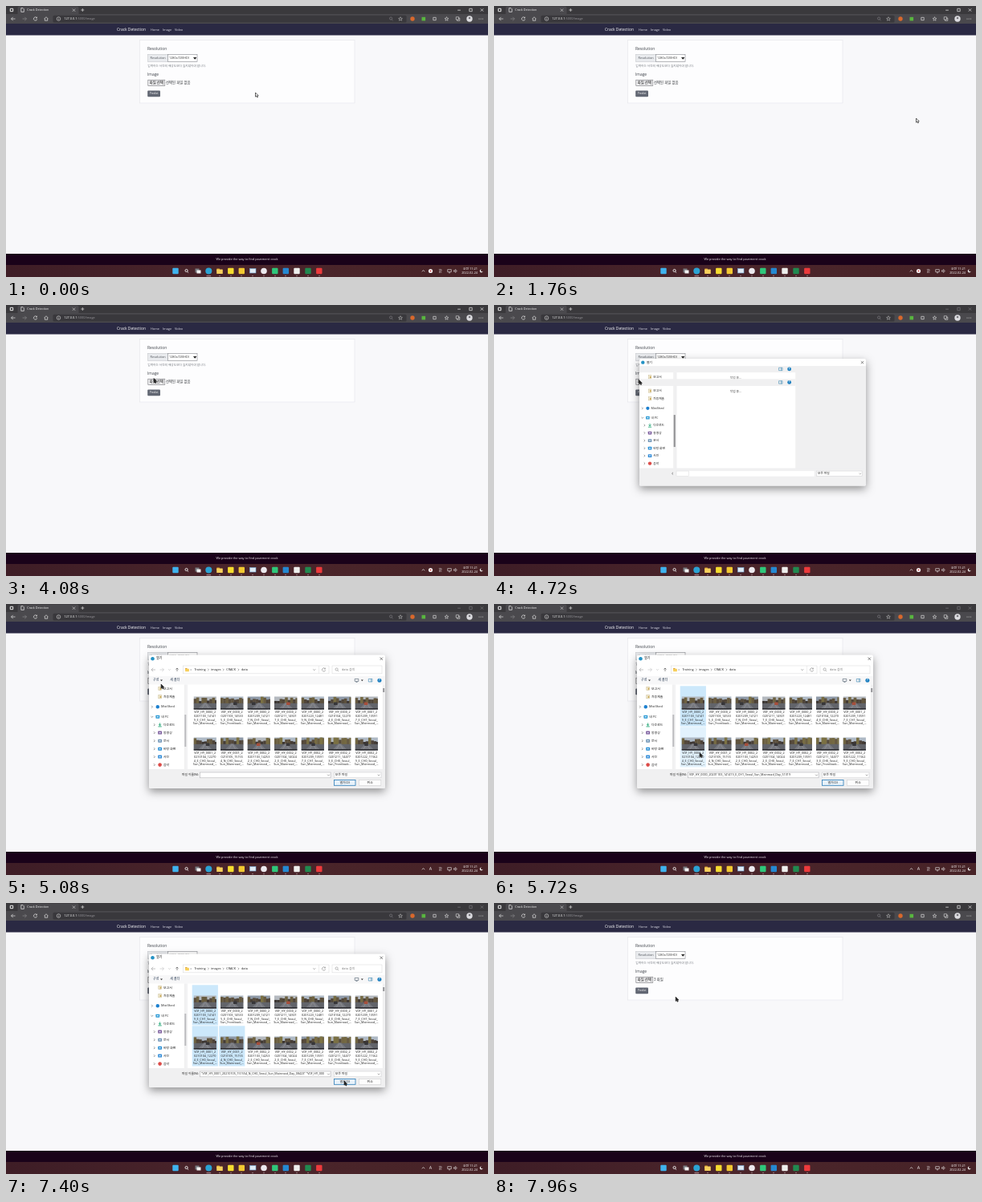
An HTML page with a canvas that plays this animation: 600 by 338 pixels, repeating every 8 s.

```html
<!DOCTYPE html>
<html lang="ko">
<head>
<meta charset="utf-8">
<title>Crack Detection</title>
<style>
html, body { margin: 0; width: 100%; height: 100%; overflow: hidden; background: #f8f8fa; }
canvas { display: block; width: 100vw; height: 100vh; }
</style>
</head>
<body>
<canvas></canvas>
<script>
const W = 600, H = 338, LOOP = 8000;
const OPEN = 4640, LOADED = 4800, PICK1 = 5440, PICK2 = 5960, PICK3 = 6240, CLOSE = 7640;
const canvas = document.querySelector('canvas');
const ctx = canvas.getContext('2d');
const ratio = window.devicePixelRatio || 1;
canvas.width = W * ratio;
canvas.height = H * ratio;

function rect(x, y, w, h, fill, border, lineWidth = 0.6) {
  if (fill) { ctx.fillStyle = fill; ctx.fillRect(x, y, w, h); }
  if (border) { ctx.strokeStyle = border; ctx.lineWidth = lineWidth; ctx.strokeRect(x, y, w, h); }
}
function round(x, y, w, h, r, fill) {
  ctx.beginPath();
  ctx.roundRect(x, y, w, h, r);
  ctx.fillStyle = fill;
  ctx.fill();
}
function dot(x, y, r, fill) {
  ctx.beginPath();
  ctx.arc(x, y, r, 0, 7);
  ctx.fillStyle = fill;
  ctx.fill();
}
// Strokes an icon path around (x, y).
function icon(path, x, y, color, width = 0.7) {
  ctx.save();
  ctx.translate(x, y);
  ctx.strokeStyle = color;
  ctx.lineWidth = width;
  ctx.stroke(new Path2D(path));
  ctx.restore();
}
function text(str, x, y, size, color, align = 'left', weight = 400) {
  ctx.font = `${weight} ${size}px "Open Sans", "Noto Sans CJK KR", "Noto Sans CJK", sans-serif`;
  ctx.textAlign = align;
  ctx.textBaseline = 'middle';
  ctx.fillStyle = color;
  ctx.fillText(str, x, y);
}

const ICON = {
  cross: 'M-1.7-1.7L1.7 1.7M1.7-1.7L-1.7 1.7',
  plus: 'M-2 0H2M0-2V2',
  box: 'M-1.7-1.7H1.7V1.7H-1.7Z',
  page: 'M-1.7-2.4H.6L1.8-1.2V2.4H-1.7Z',
  back: 'M2.5 0H-2.5M-.3-2.2L-2.5 0L-.3 2.2',
  forward: 'M-2.5 0H2.5M.3-2.2L2.5 0L.3 2.2',
  up: 'M0 2V-2M-1.6-.5L0-2L1.6-.5',
  reload: 'M1.7-1.3A2.1 2.1 0 1 0 2.1 .4M1.9-2.4V-1H.5',
  home: 'M-2.3 0L0-2.3L2.3 0M-1.7-.4V2.2H1.7V-.4',
  info: 'M2.3 0A2.3 2.3 0 1 1-2.3 0A2.3 2.3 0 1 1 2.3 0M0-.3V1.3M0-1.3V-.8',
  lens: 'M1.2-.5A1.6 1.6 0 1 1-2-.5A1.6 1.6 0 1 1 1.2-.5M.7 .8L2.1 2.2',
  star: 'M0-2.4L.7-.7L2.4-.6L1.1 .5L1.5 2.2L0 1.3L-1.5 2.2L-1.1 .5L-2.4-.6L-.7-.7Z',
  layers: 'M-2.3-2.3H1V1H-2.3ZM-1 1V2.3H2.3V-1H1',
  right: 'M-.7-1.4L.7 0L-.7 1.4',
  down: 'M-1.4-.7L0 .7L1.4-.7',
  chevUp: 'M-1.7 .8L0-.9L1.7 .8',
  screen: 'M-2.3-1.8H2.3V1.2H-2.3ZM-1 2.3H1',
  speaker: 'M-2-.7H-1L.3-1.9V1.9L-1 .7H-2ZM1.2-1Q2 0 1.2 1'
};

function drawBrowser(inactive) {
  rect(0, 0, W, 11, '#3a393c');
  round(14.5, 0.5, 76, 12, 2, '#4a494d');
  rect(0, 10, W, 12.5, '#4a494d');
  icon(ICON.box, 7, 5, '#eee', 1);
  icon(ICON.page, 20.5, 5, '#eee');
  text('Crack Detection', 26.3, 5.2, 3.7, '#f2f2f2');
  icon(ICON.cross, 84.5, 5.2, '#ddd', 0.6);
  icon(ICON.plus, 95.3, 5, '#ddd');
  const control = inactive ? '#77767a' : '#eee';
  icon('M-1.8 0H1.8', 564, 5.2, control);
  icon(ICON.box, 578.5, 5, control);
  icon(ICON.cross, 592.5, 5, control);

  icon(ICON.back, 9, 16, '#e4e4e4');
  icon(ICON.forward, 23, 16, '#88878b');
  icon(ICON.reload, 36.5, 16, '#e4e4e4');
  icon(ICON.home, 50, 16, '#e4e4e4');
  round(58.5, 11.8, 440, 8.6, 1.5, '#39383c');
  icon(ICON.info, 65.5, 16, '#ddd', 0.6);
  text('127.0.0.1', 72.2, 16.2, 3.85, '#fff');
  text(':5000/image', 88.6, 16.2, 3.85, '#98979c');
  icon(ICON.lens, 479.5, 16, '#929196', 0.5);
  icon(ICON.star, 491, 16, '#ccc', 0.5);
  dot(506, 16, 2.7, '#d9682c');
  rect(517.5, 13.8, 4.6, 4.6, '#58b63f');
  icon(ICON.box, 533.5, 16, '#ddd');
  icon(ICON.star, 548.5, 16, '#ddd', 0.6);
  icon(ICON.layers, 562.5, 16, '#ddd', 0.6);
  dot(577, 16, 3.7, '#dcdce0');
  dot(577, 15, 1.3, '#77767c');
  for (const x of [589, 591.2, 593.4]) dot(x, 16, 0.5, '#ddd');
}

function drawPage(t) {
  rect(0, 22, W, 287, '#f8f8fa');
  rect(0, 22, W, 14.5, '#2a2943');
  text('Crack Detection', 138, 29.4, 4.9, '#fff');
  text('Home', 180, 29.6, 3.9, '#dedee6');
  text('Image', 195, 29.6, 3.9, '#dedee6');
  text('Video', 210, 29.6, 3.9, '#dedee6');

  rect(166.5, 42.5, 267.5, 78.5, '#fdfdfe', '#e5e5e9');
  text('Resolution', 176, 53.4, 4.9, '#3c4048');
  rect(176.5, 60.3, 25, 9.2, '#e9ebee', '#c6c9ce');
  text('Resolution', 179.6, 65.2, 3.85, '#4a4e55');
  rect(201.5, 60.3, 36.5, 9.2, '#fff', '#85888e');
  text('1280x720(HD)', 203, 65.2, 3.8, '#333');
  ctx.fillStyle = '#222';
  ctx.fill(new Path2D('M233 64H237.4L235.2 66.7Z'));
  text('입력하는 사진의 해상도보다 높지않아야 합니다.', 176.3, 74.9, 3.7, '#777b82');
  text('Image', 176, 85.3, 4.9, '#3c4048');
  rect(176.8, 92.2, 21, 7.4, '#eeeef0', '#77777b');
  text('파일 선택', 187.3, 95.8, 4.4, '#111', 'center');
  text(t >= CLOSE ? '3 파일' : '선택된 파일 없음', 199, 95.8, 4.4, '#33363b');
  round(176.2, 105.5, 15.8, 7.8, 1, '#626773');
  text('Predict', 184.1, 109.4, 3.3, '#fff', 'center');

  rect(0, 309, W, 14, '#1a0219');
  text('We provide the way to find pavement crack', 300, 316, 3.85, '#f2eef2', 'center');
}

function folder(x, y, s) {
  round(x - s, y - s * 0.8, s, s, 0.5, '#d99a2b');
  round(x - s, y - s * 0.5, s * 2, s * 1.4, 0.5, '#f6cf5c');
}

function drawTaskbar(t) {
  const g = ctx.createLinearGradient(0, 0, W, 0);
  g.addColorStop(0, '#3e1d26');
  g.addColorStop(0.5, '#4b252b');
  g.addColorStop(1, '#472327');
  rect(0, 323, W, 15, g);
  const y = 330.5;
  const square = (x, color) => round(x - 3.7, y - 3.7, 7.4, 7.4, 1, color);
  square(211, '#3fb3ee');
  icon(ICON.lens, 225, y, '#eee', 0.9);
  rect(235.5, y - 3, 5, 5, '#777a80');
  rect(237.5, y - 1, 5, 4, '#f2f2f2');
  dot(252.3, y, 4, '#2ba3d4');
  folder(266, y, 3.8);
  square(279.8, '#f6dc2f');
  square(293.3, '#f3c831');
  rect(303.5, y - 3, 7.5, 5.5, '#dfeaf4', '#73a9d7');
  dot(321, y, 3.8, '#ece9ee');
  square(334.8, '#2fc77b');
  square(348.3, '#2589d2');
  square(362, '#eeeeec');
  square(376, '#218a50');
  square(389.8, '#ec3a3c');
  rect(249.5, 336.3, 5.6, 0.9, '#c9a3a8');
  for (const x of [266, 280, 293, 307, 321, 335, 348, 362, 376, 390]) rect(x - 1, 336.3, 2, 0.8, '#a48b8e');

  icon(ICON.chevUp, 519.5, y, '#eee');
  if (t < LOADED) {
    dot(528.5, y, 2.6, '#f5f2f2');
    dot(528.5, y, 0.9, '#d34d50');
  } else text('A', 528.5, y, 5.4, '#fff', 'center');
  text('한', 540.6, y, 4.8, '#eee', 'center');
  icon(ICON.screen, 552, y, '#eee', 0.6);
  icon(ICON.speaker, 559.5, y, '#eee', 0.6);
  text('오전 11:21', 587, 327.6, 3.9, '#fff', 'right');
  text('2022-02-24', 587, 333.2, 3.8, '#fff', 'right');
  dot(591.7, y, 1.9, '#eee');
  dot(592.6, y - 0.8, 1.6, '#472327');
}

// label, centre y, icon colour, indent, expander
const places = [
  ['보고서', 105.5, '#c8a24a', 0, ''], ['최종제출', 115.7, '#c8a24a', 0, ''],
  ['MistShed', 128.3, '#1d80cf', -3, 'right'], ['내 PC', 140.7, '#2c9bd6', -3, 'down'],
  ['다운로드', 150.7, '#25a878', 0, 'right'], ['동영상', 160.6, '#7d5a9c', 0, 'right'],
  ['문서', 170.7, '#6f93b4', 0, 'right'], ['바탕 화면', 180.7, '#268fd6', 0, 'right'],
  ['사진', 190.6, '#2f8bd8', 0, 'right'], ['음악', 200.6, '#dc4b48', 0, 'right']
];
function drawPlace([label, y, color, indent, expander]) {
  const x = 191.6 + indent * 0.8 - (indent ? 0.4 : 0);
  if (expander) icon(ICON[expander], indent ? 181.8 : 184.6, y, '#555', 0.6);
  if (label === 'MistShed') dot(x, y, 2.2, color);
  else if (!expander) { rect(x - 1.8, y - 2.2, 3.6, 4.4, '#f1ead2', '#c9b98c', 0.5); rect(x, y - 0.8, 1.6, 2, color); }
  else if (label === '다운로드') { icon('M0-2.3V1M-1.6-.5L0 1L1.6-.5M-2.2 2.2H2.2', x, y, color, 0.9); }
  else if (label === '음악') dot(x, y, 2.3, color);
  else { round(x - 2.4, y - 2, 4.8, 4, 0.6, color); rect(x - 1.1, y - 0.7, 2.2, 1.3, '#dceaf5'); }
  text(label, 196 + indent, y, 3.9, '#222');
}

const files = [
  '0000_2|0201103_14141|9_E_CH1', '0000_2|0201103_14533|5_E_CH0', '0000_2|0201209_14121|7_N_CH1',
  '0000_2|0201211_14501|7_E_CH0', '0000_2|0201223_12481|9_N_CH0', '0000_2|0210104_12270|4_E_CH0',
  '0001_2|0201209_13591|7_E_CH1', '0001_2|0210104_12270|4_E_CH0', '0001_2|0210105_15155|4_N_CH0',
  '0002_2|0201103_14253|2_E_CH0', '0002_2|0201104_14024|2_E_CH0', '0002_2|0201209_13591|7_E_CH1',
  '0002_2|0201211_14477|3_E_CH0', '0002_2|0201222_11562|9_E_CH0'
];
const random = seed => { const v = Math.sin(seed * 91.7 + 3.1) * 43758.5; return v - Math.floor(v); };

// A small dashcam view: sky, trees, road, cars.
function drawThumb(i, x, y) {
  ctx.save();
  ctx.beginPath();
  ctx.rect(x, y, 28.4, 16.2);
  ctx.clip();
  rect(x, y, 29, 17, ['#b4b9bf', '#aeb9c5', '#8f9aa8'][i % 3]);
  for (let k = 0; k < 9; k++) {
    const r = random(i * 10 + k), height = 3 + r * 6;
    rect(x + k * 3.3, y + 9 - height, 3.6, height, `hsl(${20 + r * 30}, ${8 + r * 22}%, ${20 + r * 18}%)`);
  }
  rect(x, y + 8.5, 29, 8, '#62646a');
  ctx.fillStyle = '#777980';
  ctx.fill(new Path2D(`M${x + 13} ${y + 8}H${x + 16}L${x + 25} ${y + 17}H${x + 4}Z`));
  icon('M0 0L-5 8M1 0L6 8', x + 14, y + 9, '#aaaaa6', 0.4);
  if (i % 4 !== 0) round(x + 5 + random(i) * 14, y + 7.2, 4.6, 3.6, 0.6, i % 3 ? '#373639' : '#a64f3c');
  rect(x, y + 14.8, 29, 2, '#29292d');
  ctx.restore();
}

function drawFile(name, i, t) {
  const column = i % 7, row = Math.floor(i / 7);
  const x = 247.7 + column * 33.5, y = 102 + row * 51;
  const selected = (i === 0 && t >= PICK1) || (i === 7 && t >= PICK2) || (i === 8 && t >= PICK3);
  const hovered = i === 7 && t > 5560;
  if (selected || hovered) rect(x - 16, y + 0.3, 32.2, 50.2, selected ? '#cce8fb' : '#e2f2fd');
  drawThumb(i, x - 14.2, y + 13.3);
  const [id, date, tail] = name.split('|');
  const last = i === 1 || i === 12 ? 'Sun_Frontback...' : 'Sun_Mainroad_...';
  ['V0F_HY_' + id, date, tail + '_Seoul_', last]
    .forEach((line, k) => text(line, x, y + 33.4 + k * 4.6, 3.75, '#1d1d1d', 'center'));
}

function drawFrame() {
  ctx.save();
  ctx.shadowColor = 'rgba(0,0,0,.42)';
  ctx.shadowBlur = 11 * ratio;
  ctx.shadowOffsetY = 4 * ratio;
  round(178, 63.5, 294, 166.5, 2, '#fff');
  ctx.restore();
  dot(182.5, 68.3, 2.3, '#2492c4');
  text('열기', 187, 68.3, 4.1, '#222');
  icon(ICON.cross, 467.3, 68.3, '#333', 0.6);
}

function helpIcons(x, y) {
  icon('M-2.3-1.8H2.3V1.8H-2.3ZM.8-1.8V1.8', x, y, '#3684b0', 0.6);
  dot(x + 11.3, y, 2.5, '#1b7fc0');
  text('?', x + 11.3, y + 0.1, 3.6, '#fff', 'center', 700);
}

function drawLoadingDialog() {
  ctx.save();
  ctx.translate(181, 67);
  ctx.scale(0.959, 0.952);
  ctx.translate(-178, -63.4);
  drawFrame();
  rect(178, 73, 294, 8.4, '#f0f0f1');
  rect(380.5, 73, 91.5, 136, '#f0f0f1');
  rect(222, 81, 4.5, 127, '#f0f0f1');
  drawPlace(['보고서', 87.4, '#c8a24a', 0, '']);
  text('작업 중...', 303, 89, 3.9, '#555', 'center');
  rect(178, 90, 202.5, 9, '#f0f0f1');
  helpIcons(361.3, 77);
  helpIcons(361.3, 94.3);
  places.forEach(drawPlace);
  text('작업 중...', 303, 106.3, 3.9, '#444', 'center');
  rect(222.5, 137, 2.2, 42, '#929295');
  round(178, 206.8, 294, 23.2, [0, 0, 2, 2], '#f0f0f1');
  icon('M.7-1.4L-.7 0L.7 1.4', 221, 213.8, '#555');
  rect(226, 210.5, 179, 7, '#fff');
  rect(226, 210.5, 16, 7, '#fff', '#dcdcde');
  rect(408, 210.5, 59, 7, '#fff', '#d4d4d6');
  text('모든 파일', 409.5, 214, 3.9, '#222');
  icon(ICON.down, 464.5, 214, '#666', 0.5);
  ctx.restore();
}

function drawDialog(t) {
  drawFrame();
  icon(ICON.back, 183.5, 82, '#9a9a9c', 0.6);
  icon(ICON.forward, 194, 82, '#c0c0c2', 0.6);
  icon(ICON.down, 203.5, 82, '#aaa', 0.5);
  icon(ICON.up, 213, 82, '#444', 0.6);
  rect(220.5, 77, 181.5, 9.8, '#fff', '#dcdcde');
  folder(225.5, 82, 2.4);
  text('«', 229.3, 81.6, 3.9, '#555');
  for (const [label, x] of [['Training', 234.4], ['images', 255], ['CRACK', 274.3], ['data', 293]])
    text(label, x, 82, 3.8, '#222');
  for (const x of [251.8, 270.6, 289.4]) icon(ICON.right, x, 82, '#555', 0.5);
  icon(ICON.down, 383.8, 82, '#555', 0.5);
  rect(389.5, 77, 0.5, 9.8, '#dcdcde');
  icon(ICON.reload, 395.5, 82, '#666', 0.5);
  rect(406, 77, 62, 9.8, '#fff', '#dcdcde');
  icon(ICON.lens, 412, 82, '#777', 0.5);
  text('data 검색', 418, 82, 3.8, '#777');

  rect(178, 89.8, 294, 10.6, '#f7f7f8');
  text('구성', 183, 95.2, 4, '#21344d');
  ctx.fillStyle = '#333';
  ctx.fill(new Path2D('M192 94.5H195L193.5 96.2ZM441.8 94.5H444.8L443.3 96.2Z'));
  text('새 폴더', 204.3, 95.2, 4, '#21344d');
  icon(ICON.screen, 436.5, 95.2, '#456', 0.6);
  helpIcons(453.6, 95.2);

  places.forEach(drawPlace);
  rect(221.8, 100.5, 3, 105.5, '#f0f0f1');
  rect(222.3, 138, 2, 40, '#bcbcbf');
  rect(225.6, 100.5, 0.5, 105.5, '#e2e2e4');
  files.forEach((name, i) => drawFile(name, i, t));
  rect(468.7, 100.5, 3, 105.5, '#f0f0f1');
  rect(469.2, 105, 2, 5, '#949498');

  round(178, 206, 294, 24, [0, 0, 2, 2], '#f0f0f1');
  text('파일 이름(N):', 240, 213.2, 3.8, '#222', 'right');
  rect(241.6, 210, 162.5, 6.8, '#fff', '#b5b5b8');
  const name = t < PICK1 ? ''
    : t < PICK2 ? 'V0F_HY_0000_20201103_141419_E_CH1_Seoul_Sun_Mainroad_Day_51319'
    : t < PICK3 ? '"V0F_HY_0001_20210104_122704_E_CH0_Seoul_Sun_Mainroad_Day_08417" "V0F_HY_0000'
    : '"V0F_HY_0001_20210105_151554_N_CH0_Seoul_Sun_Mainroad_Day_08423" "V0F_HY_000';
  ctx.save();
  ctx.beginPath();
  ctx.rect(242, 210, 157, 7);
  ctx.clip();
  text(name, 243, 213.4, 3.7, '#222');
  ctx.restore();
  icon(ICON.down, 401.5, 213.4, '#555', 0.5);
  rect(408.3, 210, 58.7, 6.8, '#fff', '#d0d0d3');
  text('모든 파일', 409.8, 213.4, 3.9, '#222');
  icon(ICON.down, 464, 213.4, '#555', 0.5);
  rect(408.5, 219.5, 26.5, 6.8, '#e8f2fa', '#2b7cb8', 0.8);
  text('열기(O)', 421.7, 222.9, 3.9, '#222', 'center');
  rect(439.5, 219.5, 27.3, 6.8, '#fdfdfd', '#d0d0d3');
  text('취소', 453.2, 222.9, 3.9, '#222', 'center');
}

// time, x, y of the pointer; eased between stops
const path = [
  [0, 310.5, 108], [920, 310.5, 108], [1600, 525.5, 140], [1800, 525.5, 140],
  [2920, 228.3, 65.2], [3480, 228.3, 65.2], [4200, 180.6, 93.6], [4960, 180.6, 93.6],
  [5400, 248, 128], [5480, 248, 128], [5720, 256, 185.5], [6000, 256, 186],
  [6200, 281, 184], [6280, 281, 184], [6560, 410.6, 213.3], [6760, 421, 222],
  [7600, 421, 222], [7920, 226.2, 117.2], [LOOP, 226.2, 117.2]
];
function drawPointer(t) {
  const next = path.findIndex(stop => stop[0] > t);
  const [t0, x0, y0] = path[next - 1], [t1, x1, y1] = path[next];
  const u = (t - t0) / (t1 - t0), e = u * u * (3 - 2 * u);
  ctx.save();
  ctx.translate(x0 + (x1 - x0) * e, y0 + (y1 - y0) * e);
  const arrow = new Path2D('M0 0V5.2L1.2 4.1L2.1 6L3 5.6L2.1 3.8H3.7Z');
  ctx.lineWidth = 0.7;
  ctx.strokeStyle = '#222';
  ctx.fillStyle = t < 2600 ? '#fff' : '#222';
  ctx.fill(arrow);
  ctx.stroke(arrow);
  ctx.restore();
}

function draw(t) {
  ctx.setTransform(ratio, 0, 0, ratio, 0, 0);
  const open = t >= OPEN && t < CLOSE;
  drawBrowser(open);
  drawPage(t);
  drawTaskbar(t);
  if (open) t < LOADED ? drawLoadingDialog() : drawDialog(t);
  drawPointer(t);
}

const start = performance.now();
function tick() {
  draw((performance.now() - start) % LOOP);
  requestAnimationFrame(tick);
}
tick();
</script>
</body>
</html>
```
